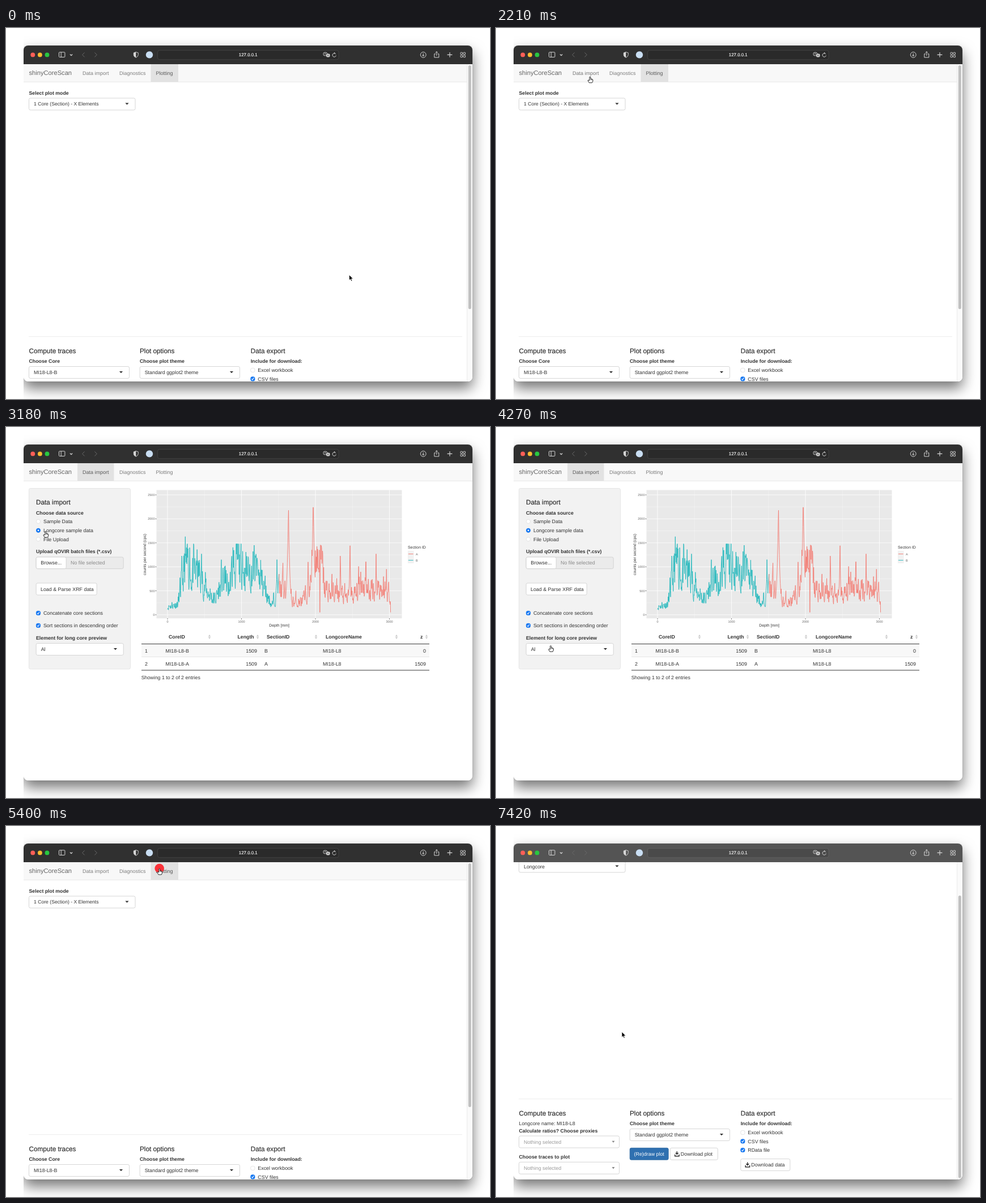
Write an HTML page that moves like this. It is 854 px wide and 656 px high and loops after 8 s.

```html
<!DOCTYPE html>
<html lang="en">
<head>
<meta charset="utf-8">
<title>Core scan walkthrough</title>
<style>
  html, body { margin: 0; width: 100%; height: 100%; overflow: hidden; background: #fff; }
  #shadow { position: absolute; left: 31px; top: 31px; width: 792px; height: 594px; border-radius: 8px;
    box-shadow: 0 12px 25px rgba(0,0,0,.55), 0 0 1px rgba(0,0,0,.5); }
  svg { position: absolute; left: 0; top: 0; display: block; }
  text { font: 8.9px "Liberation Sans", Arial, sans-serif; fill: #333; text-rendering: geometricPrecision; white-space: pre; }
</style>
</head>
<body>
<div id="shadow"></div>
<svg id="stage" width="854" height="656" viewBox="0 0 854 656"></svg>
<script>
const LOOP = 8000;

// ---- drawing helpers: y of a text is its visual middle ----
const text = (x, y, s, { size = 8.9, bold, fill = '#333', anchor = 'start', extra = '' } = {}) =>
  `<text x="${x}" y="${y + size * .35}" text-anchor="${anchor}" style="font-size:${size}px;fill:${fill};${bold ? 'font-weight:700' : ''}" ${extra}>${s}</text>`;
const label = (x, y, s) => text(x, y, s, { bold: true, size: 8.78 });
const heading = (x, y, s) => text(x, y, s, { size: 11.75, extra: 'stroke="#333" stroke-width=".2"' });
const rect = (x, y, w, h, fill, extra = '') => `<rect x="${x}" y="${y}" width="${w}" height="${h}" fill="${fill}" ${extra}/>`;
const box = (x, y, w, h = 21, fill = '#fff', stroke = '#ccc', extra = '') =>
  rect(x, y, w, h, fill, `rx="2.6" stroke="${stroke}" stroke-width=".8" ${extra}`);
const path = (d, stroke, width = 1, extra = '') => `<path d="${d}" fill="none" stroke="${stroke}" stroke-width="${width}" ${extra}/>`;
const caret = (x, y, dir = 1, r = 3.1, fill = '#333') =>
  `<path d="M${x - r} ${y - 1.6 * dir}h${2 * r}l${-r} ${3.4 * dir}z" fill="${fill}"/>`;
const group = (id, body) => `<g id="${id}">${body}</g>`;

const select = (x, y, w, s, caretX, size) =>
  box(x, y, w) + text(x + 8.5, y + 10.4, s, { size }) + caret(caretX, y + 10);
const emptySelect = y =>
  box(40.5, y, 177) + text(49, y + 10.4, 'Nothing selected', { fill: '#999' }) + caret(207, y + 10.3, 1, 2.5, '#888');
const check = (x, y, on, s) => box(x - 3.6, y - 3.6, 7.2, 7.2, on ? '#1476f1' : '#fff', on ? '#1476f1' : '#ddd') +
  (on ? path(`M${x - 2} ${y}l1.5 1.8 2.5-3.8`, '#fff', 1.1) : '') + text(x + 8.9, y, s);
const radio = (y, on, s) => `<circle cx="57" cy="${y}" r="3.6" fill="${on ? '#1476f1' : '#fff'}" stroke="${on ? '#1476f1' : '#ddd'}" stroke-width=".8"/>` +
  (on ? `<circle cx="57" cy="${y}" r="1.4" fill="#fff"/>` : '') + text(66, y, s);
const downloadButton = (x, y, w, s) => box(x, y, w) +
  path(`M${x + 12} ${y + 6}v5m-2.4-2.4l2.4 2.5 2.4-2.5M${x + 8.4} ${y + 11.5}v3h7.4v-3`, '#333', 1.5) + text(x + 18.5, y + 10.4, s);

// ---- browser frame ----
const toolbar = () => {
  const light = '#d8d8d8', dim = '#696969';
  return rect(31, 31, 792, 33, '#303030', 'id="bar"') +
    ['#ff5f57', '#febc2e', '#28c840'].map((c, i) => `<circle cx="${47.3 + i * 12.6}" cy="47.4" r="3.9" fill="${c}"/>`).join('') +
    path('M94.5 42.8h8.4q1 0 1 1v6.7q0 1-1 1h-8.4q-1 0-1-1v-6.7q0-1 1-1zM97.2 43v8.3', light) +
    path('M113 46.5l2.1 2.1 2.1-2.1', light, 1.2) +
    path('M138.6 43.4l-4 4 4 4M156.4 43.4l4 4-4 4', dim) +
    path('M229.3 42.5l4 1.4v3.5q0 3-4 4.9-4-1.9-4-4.9v-3.5z', light, .9) +
    `<path d="M229.3 42.5v9.8q-4-1.9-4-4.9v-3.5z" fill="${light}"/><circle cx="253" cy="47.4" r="6.2" fill="#c9def3"/>` +
    rect(267.5, 39.4, 319.5, 16.4, '#000', 'rx="3.6" fill-opacity=".12" stroke="#fff" stroke-opacity=".12" stroke-width=".8"') +
    text(427.3, 47.6, '127.0.0.1', { size: 7.9, fill: '#fff', anchor: 'middle', extra: 'stroke="#fff" stroke-width=".15"' }) +
    `<rect x="560" y="43.2" width="6.5" height="5.6" rx="2" fill="none" stroke="${light}" stroke-width=".9"/><rect x="565" y="45.6" width="6.5" height="5.8" rx="2" fill="${light}"/>` +
    path('M561.7 45.2h3m-1.5 0v2', light, .7) + path('M566.8 50l1.4-3 1.4 3', '#333', .7) +
    path('M581.9 46.3a3.2 3.2 0 1 0 .4 2.4M580 43l-.8 1.6 1.8.8', light) +
    `<circle cx="736.2" cy="47.4" r="4.9" fill="none" stroke="${light}"/>` +
    path('M736.2 44.8v5m-2-1.9l2 2 2-2', light) +
    path('M758 45.8h-2.2v6.2h8v-6.2h-2.2M759.8 49v-7.3m-2 2l2-2 2 2', light) +
    path('M783 43v8.8m-4.4-4.4h8.8', light, 1.1) +
    [802, 807].map(x => [43.2, 48.2].map(y => rect(x, y, 3.5, 3.5, 'none', `rx=".6" stroke="${light}" stroke-width=".9"`)).join('')).join('');
};

const TABS = [['Data import', 126, 64.5], ['Diagnostics', 191, 64], ['Plotting', 255.5, 48.5]];
const navbar = (active, right) => rect(31, 64, right - 31, 31, '#f8f8f8') + rect(31, 95, right - 31, .8, '#e4e4e4') +
  text(40.5, 79.2, 'shinyCoreScan', { size: 11.15, fill: '#666' }) +
  TABS.map(([name, x, w], i) => (i === active ? rect(x, 64, w, 31, '#e2e2e2') : '') +
    text(x + 9, 79.6, name, { size: 9.02, fill: i === active ? '#555' : '#777', extra: `data-tab="${i}"` })).join('');

// ---- plotting page ----
const MODES = ['1 Core (Section) - X Elements', 'X Cores (Sections) - 1 Element', 'Longcore'];
const plottingPage = () => navbar(2, 813) + label(40.5, 114.5, 'Select plot mode') +
  group('modeFirst', select(40.5, 124, 187.5, MODES[0], 213.5, 8.65)) +
  group('modeLong', select(40.5, 124, 187.5, MODES[2], 213.5)) +
  rect(40, 545.3, 765, .8, '#e9e9e9') +
  heading(40.5, 571, 'Compute traces') + heading(236, 571, 'Plot options') + heading(431.7, 571, 'Data export') +
  group('singleCore', label(40.5, 589.3, 'Choose Core') + select(40.5, 598.5, 177, 'MI18-L8-B', 203)) +
  group('longCore', text(40.5, 589, 'Longcore name: MI18-L8') + label(40.5, 601.5, 'Calculate ratios? Choose proxies') +
    emptySelect(611) + label(40.5, 647.8, 'Choose traces to plot') + emptySelect(657.3)) +
  label(236, 589.3, 'Choose plot theme') + select(236.2, 598.5, 176.3, 'Standard ggplot2 theme', 398) +
  box(236.2, 632.3, 68, 21, '#2f70b0', '#2a659f') + text(270.2, 642.7, '(Re)draw plot', { fill: '#fff', anchor: 'middle' }) +
  downloadButton(307.3, 632.3, 84, 'Download plot') +
  label(431.7, 589.3, 'Include for download:') +
  check(435.4, 605, false, 'Excel workbook') + check(435.4, 620.4, true, 'CSV files') + check(435.4, 636, true, 'RData file') +
  downloadButton(431.8, 651.6, 87, 'Download data') +
  group('dropdown', box(40.5, 124, 187.5, 21, 'none', '#5aa9ee', 'filter="url(#glow)"') +
    select(40.5, 124, 187.5, MODES[0], 300, 8.65) + rect(228.5, 126, 90, 16, '#fff') +
    box(40.5, 124, 187.5, 21, 'none', '#5aa9ee') + caret(213.5, 134, -1) +
    box(40.8, 147, 187.2, 55.5, '#fff', '#ccc', 'filter="url(#lift)"') + rect(41.2, 182.5, 186.4, 16.6, '#f4f4f4', 'id="row"') +
    MODES.map((m, i) => text(49, 158.2 + i * 16.4, m, { size: i < 2 ? 8.65 : 8.9 })).join(''));

// ---- element trace: anchors of the local mean, plus single spikes ----
const MEAN = [[0, 180], [140, 220], [175, 480], [240, 950], [330, 800], [420, 830], [500, 560], [640, 300], [740, 650], [830, 520],
  [900, 950], [1050, 900], [1200, 850], [1300, 560], [1420, 190], [1480, 500], [1550, 520], [1600, 350], [1700, 260], [1850, 260],
  [1930, 600], [2000, 1300], [2070, 1050], [2130, 480], [2300, 420], [2420, 330], [2560, 400], [2620, 750], [2720, 450], [2850, 600], [3018, 400]];
const SPIKES = [[240, 1630], [300, 1400], [390, 1340], [460, 1270], [780, 1020], [885, 1570], [1015, 1480], [1090, 1380], [1210, 1450],
  [1260, 1140], [1480, 1150], [1560, 1080], [1635, 2290], [1900, 1100], [1970, 2475], [2337, 1370], [2467, 1610], [2682, 1380], [2820, 1270], [2960, 950]];
let seed = 11;
const random = () => (seed = seed * 16807 % 2147483647) / 2147483647;
const meanAt = mm => {
  const i = Math.max(1, MEAN.findIndex(p => p[0] >= mm)), [a, b] = [MEAN[i - 1], MEAN[i]];
  return a[1] + (b[1] - a[1]) * (mm - a[0]) / (b[0] - a[0]);
};
let drift = 0;
const trace = Array.from({ length: 755 }, (_, i) => {
  const mm = i * 4;
  drift = drift * .5 + (random() - .5) * .95;
  let v = Math.min(meanAt(mm) * Math.exp(drift), 1480);
  for (const [at, top] of SPIKES) v = Math.max(v, top * Math.exp(-Math.abs(mm - at) / (top > 2000 ? 20 : 9)));
  if (mm === 2060 || mm === 3016) v = 50;
  return [mm, v];
});

const chart = (x0, perMm, right, axisX) => {
  const X = mm => x0 + mm * perMm, Y = v => 332 - v * .0848, TEAL = '#1cb6bb', RED = '#f4766d';
  const line = (points, color) =>
    path('M' + points.map(([mm, v]) => `${X(mm).toFixed(1)} ${Y(v).toFixed(1)}`).join('L'), color, .85, 'stroke-linejoin="round"');
  let s = rect(265.5, 111.5, right - 265.5, 226.8, '#e9e9e9');
  for (let v = 0; v <= 2500; v += 250) s += path(`M265.5 ${Y(v)}H${right}`, '#fff', v % 500 ? .35 : .8);
  for (let mm = 0; mm <= 3000; mm += 500) s += path(`M${X(mm)} 111.5V338.3`, '#fff', mm % 1000 ? .35 : .8);
  s += line(trace.slice(0, 378), TEAL) + line(trace.slice(377), RED);
  const small = { size: 5.5, fill: '#666' };
  for (let v = 0; v <= 2500; v += 500) s += path(`M263.5 ${Y(v)}h2`, '#333', .7) + text(262.5, Y(v), v, { ...small, anchor: 'end' });
  for (let mm = 0; mm <= 3000; mm += 1000) s += path(`M${X(mm)} 338.3v2`, '#333', .7) + text(X(mm), 343.6, mm, { ...small, anchor: 'middle' });
  s += text(axisX, 351, 'Depth [mm]', { size: 6.9, anchor: 'middle' }) +
    text(0, 0, 'counts per second (cps)', { size: 6.85, anchor: 'middle', extra: 'transform="translate(245 225.5) rotate(-90)"' });
  if (right < 800) s += text(709, 212.6, 'Section ID', { size: 6.9 }) + rect(709, 219, 10.6, 22, '#f1f1f1') +
    path('M710 224.5h8.6', RED, .9) + path('M710 235.6h8.6', TEAL, .9) + text(723, 224.7, 'A', small) + text(723, 235.7, 'B', small);
  return s;
};

const table = () => {
  const headers = [['CoreID', 287, 359], ['Length', 408.5, 444], ['SectionID', 460, 547], ['LongcoreName', 564, 689], ['z', 731, 742]];
  const row = (y, cells) => cells.map((c, i) => text([245, 281.5, 443, 456, 559, 741][i], y, c, { anchor: i === 2 || i === 5 ? 'end' : 'start' })).join('');
  return headers.map(([name, x, icon]) => label(x, 371, name) + caret(icon, 368.8, -1, 2.2, '#ccc') + caret(icon, 373.2, 1, 2.2, '#ccc')).join('') +
    rect(239, 383.8, 508, 22.6, '#f8f8f8') + rect(239, 383.2, 508, .9, '#222') + rect(239, 406.3, 508, .7, '#ddd') + rect(239, 429.6, 508, .9, '#222') +
    row(395.4, [1, 'MI18-L8-B', 1509, 'B', 'MI18-L8', 0]) + row(418.6, [2, 'MI18-L8-A', 1509, 'A', 'MI18-L8', 1509]) +
    text(238.7, 443, 'Showing 1 to 2 of 2 entries', { size: 8.8 });
};

const importPage = () => navbar(0, 823) + box(40.5, 108.5, 179, 319.5, '#f2f2f2', '#e1e1e1') +
  heading(53, 133, 'Data import') + label(53, 151.6, 'Choose data source') +
  radio(167, false, 'Sample Data') + radio(182.8, true, 'Longcore sample data') + radio(198.4, false, 'File Upload') +
  label(53, 220.2, 'Upload qOVIR batch files (*.csv)') +
  box(53.2, 230, 154, 20.6, '#ebebeb') + text(114, 240.3, 'No file selected', { fill: '#888' }) +
  box(53.2, 230, 53, 20.6) + text(61.3, 240.3, 'Browse...') +
  box(53.2, 276, 107, 21, '#fff', '#ccc', 'id="load"') + text(61, 286.5, 'Load &amp; Parse XRF data') +
  check(57, 329, true, 'Concatenate core sections') + check(57, 351, true, 'Sort sections in descending order') +
  label(53, 373, 'Element for long core preview') + select(53.2, 382.5, 154, 'Al', 193) +
  group('wide', chart(291, .167, 821, 543) + rect(31, 616, 792, 10, '#fafafa') + rect(31, 615.5, 792, .8, '#e6e6e6') +
    rect(33, 617.8, 743.5, 5, '#c1c1c1', 'rx="2.5"')) +
  group('narrow', chart(285, .1305, 698.5, 482)) + table();

const stage = document.getElementById('stage');
stage.innerHTML = `<defs><clipPath id="window"><rect x="31" y="31" width="792" height="594" rx="8"/></clipPath>
  <filter id="glow" x="-10%" y="-50%" width="120%" height="200%"><feDropShadow dx="0" dy="0" stdDeviation="2" flood-color="#66afe9" flood-opacity=".7"/></filter>
  <filter id="lift" x="-10%" y="-20%" width="120%" height="150%"><feDropShadow dx="0" dy="3" stdDeviation="3" flood-opacity=".2"/></filter></defs>` +
  rect(0, 0, 31, 656, '#fff') + `<g clip-path="url(#window)">` + rect(31, 31, 792, 594, '#fff') +
  group('plotting', group('scrolled', plottingPage()) + rect(813, 64, 10, 561, '#fafafa') + rect(813, 64, .8, 561, '#e6e6e6') +
    rect(815.8, 66, 5, 431, '#c1c1c1', 'rx="2.5" id="thumb"')) +
  group('importing', importPage()) + toolbar() + '</g>' +
  '<circle id="click" fill="#fb3239"/>' +
  group('arrow', '<path d="M0 0V9.6L2.2 7.6 3.7 11.1 5.3 10.4 3.8 7H6.9Z" fill="#000" stroke="#fff" stroke-width=".7"/>') +
  group('hand', '<path d="M-1 1Q0-.6 1 1V4.2Q5 4 5 6.4 5 9 3.6 11H-1.6Q-2.8 9-4 7-3.4 5.4-1 7Z" fill="#fff" stroke="#111" stroke-width=".9"/>' +
    path('M1 4v2.4M2.5 4.6v1.9M3.9 5v1.7', '#111', .5));

// ---- timeline ----
const POINTER = [[0, 605.5, 436.5], [640, 605.5, 436.5], [1160, 377, 303], [1480, 252, 180], [2200, 166, 85.8], [2500, 166, 85.8],
  [3180, 70, 184], [3330, 59, 189], [3470, 59, 189], [4270, 96.5, 386], [4310, 103, 390], [4700, 430, 290], [5100, 270.7, 75],
  [5460, 270.7, 75], [6000, 150, 134], [6140, 150, 134], [6450, 150.7, 195.5], [6780, 150.7, 195.5], [7360, 222, 364], [LOOP, 222, 364]];
const CLICKS = [[2260, 2410], [5240, 5400], [6010, 6140], [6500, 6790]];
const SAME = (a, b) => a[1] === b[1] && a[2] === b[2];

// Hermite curve through the pointer stops, at rest where two stops coincide
function pointerAt(t) {
  const i = POINTER.findIndex(p => p[0] > t) - 1, a = POINTER[i], b = POINTER[i + 1], span = b[0] - a[0], u = (t - a[0]) / span;
  const slope = (k, axis) => {
    const before = POINTER[k - 1], here = POINTER[k], after = POINTER[k + 1];
    if (!before || !after || SAME(before, here) || SAME(here, after)) return 0;
    return (after[axis] - before[axis]) / (after[0] - before[0]);
  };
  return [1, 2].map(axis => {
    const rise = u * u * (3 - 2 * u);
    return a[axis] * (1 - rise) + b[axis] * rise + span * u * (1 - u) * ((1 - u) * slope(i, axis) - u * slope(i + 1, axis));
  });
}
const clickRadius = t => {
  const c = CLICKS.find(([down, up]) => t >= down && t < up + 130);
  return !c ? 0 : t < c[1] ? 13.6 : t < c[1] + 75 ? 8.3 : 4;
};
const inside = (x, y, [l, t, w, h]) => x >= l && x < l + w && y >= t && y < t + h;
const NAV = [126, 64, 178, 31], LOAD = [53, 276, 107, 21];
const HOT = { plotting: [NAV, [40, 124, 188, 21]], importing: [NAV, [53, 160, 100, 44], LOAD, [53, 382, 154, 22]] };

const byId = id => document.getElementById(id);
const show = (id, on) => { byId(id).style.display = on ? '' : 'none'; };
const tabs = [...document.querySelectorAll('[data-tab]')];

function render(t) {
  const page = t >= 2410 && t < 5400 ? 'importing' : 'plotting';
  const open = t >= 6150 && t < 6790, long = t >= 6790;
  const [x, y] = pointerAt(t);
  show('importing', page === 'importing');
  show('plotting', page === 'plotting');
  show('wide', t < 2800);
  show('narrow', t >= 2800);
  show('dropdown', open);
  for (const id of ['modeLong', 'longCore']) show(id, long);
  for (const id of ['modeFirst', 'singleCore']) show(id, !long);

  const u = Math.min(1, Math.max(0, (t - 6950) / 430)), scroll = u * u * (3 - 2 * u);
  byId('scrolled').setAttribute('transform', `translate(0 ${-63 * scroll})`);
  byId('thumb').setAttribute('y', 66 + 57 * scroll);
  byId('thumb').setAttribute('height', long ? 499.5 : 431);
  const grey = Math.round(48 + 36 * scroll);
  byId('bar').setAttribute('fill', `rgb(${grey},${grey},${grey})`);

  for (const tab of tabs) {
    const [, left, width] = TABS[tab.dataset.tab];
    tab.style.opacity = inside(x, y, [left, 64, width, 31]) ? 1 : .95;
  }
  byId('load').setAttribute('fill', inside(x, y, LOAD) ? '#e6e6e6' : '#fff');
  byId('row').setAttribute('y', 149.9 + 16.3 * Math.min(2, Math.max(0, Math.floor((y - 150) / 16.4))));

  const hand = HOT[page].some(area => inside(x, y, area));
  show('hand', hand);
  show('arrow', !hand);
  byId(hand ? 'hand' : 'arrow').setAttribute('transform', `translate(${x} ${y})`);
  const click = byId('click');
  click.setAttribute('cx', x);
  click.setAttribute('cy', y);
  click.setAttribute('r', clickRadius(t));
}

const start = performance.now();
function frame() {
  render((performance.now() - start) % LOOP);
  requestAnimationFrame(frame);
}
frame();
</script>
</body>
</html>
```
